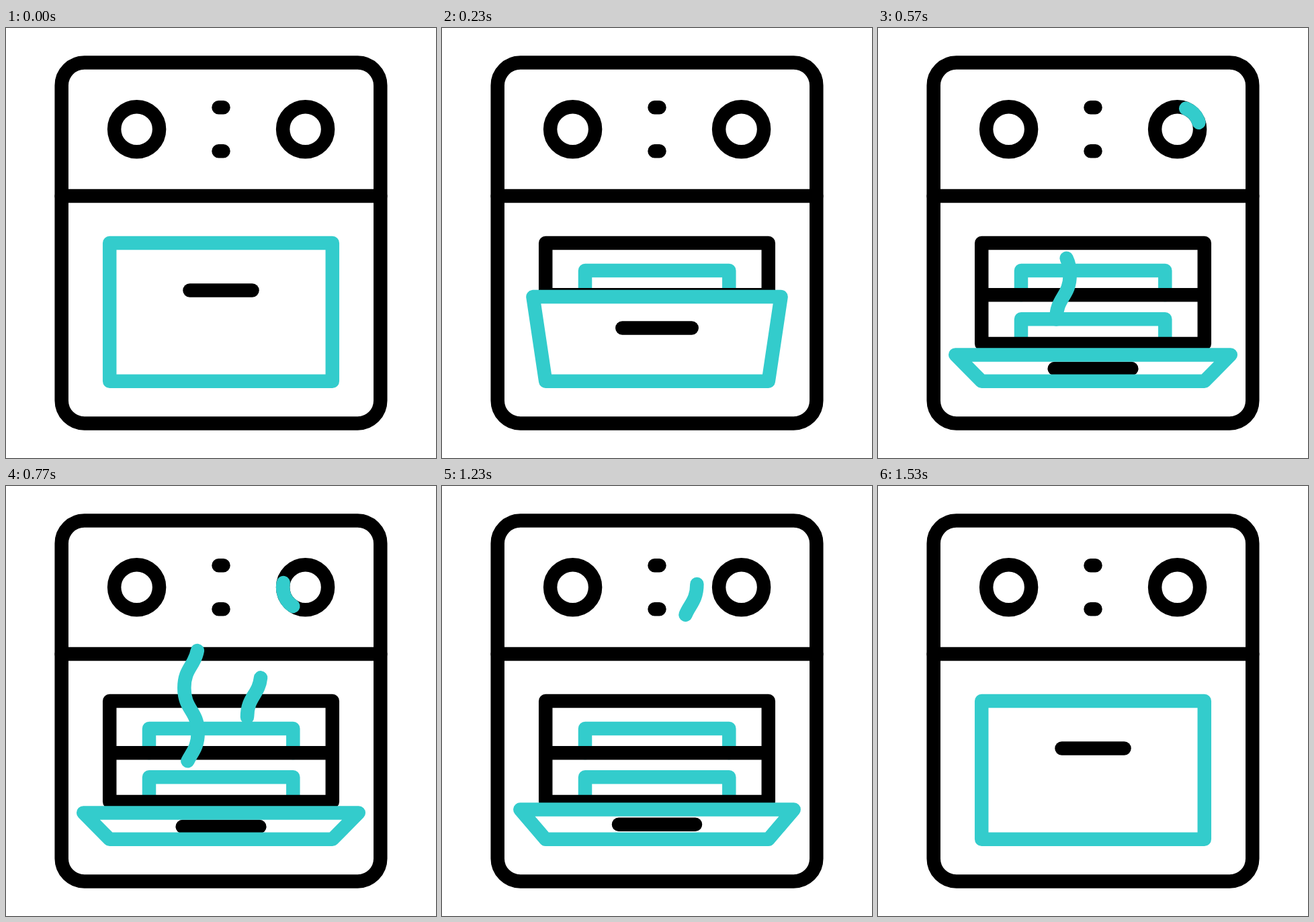
Recreate the animation shown at these times as an HTML page. Size 640 px wide and 640 px high, loop 1.67 s.

```html
<!DOCTYPE html>
<html lang="en">
<head>
<meta charset="utf-8">
<title>Oven</title>
<style>
  html, body { margin: 0; width: 100%; height: 100%; overflow: hidden; background: #fff; }
  svg { display: block; width: 100vw; height: 100vh; }
  svg * { stroke-linecap: round; stroke-linejoin: round; }
  .ink { stroke: #000; }
  .teal { stroke: #3cc; }
</style>
</head>
<body>
<svg viewBox="0 0 640 640" fill="none" stroke-width="20.5">
  <g class="ink">
    <rect x="82.7" y="51.5" width="474.6" height="537" rx="34"/>
    <path d="M82.7 250H557.3M316.5 118.2h7M316.5 183.2h7"/>
    <circle cx="194.6" cy="150.8" r="33.5"/>
    <circle cx="445.6" cy="150.8" r="33.5"/>
  </g>
  <g id="inside">
    <path class="teal" d="M213 397V361H427.3V397M213 470V433.3H427.3V470"/>
    <path class="ink" d="M154.2 470V320H485.8V470ZM154.2 397.3H485.8"/>
  </g>
  <path id="panel" fill="#fff"/>
  <path id="handle" class="ink"/>
  <path id="door" class="teal"/>
  <g class="teal">
    <path id="dial" pathLength="1" d="M445.6 117.3a33.5 33.5 0 0 1 0 67a33.5 33.5 0 0 1 0-67"/>
    <path id="steamA" pathLength="1"/>
    <path id="steamB" pathLength="1"/>
  </g>
</svg>
<script>
const LOOP = 1670, FPS = 30;
const $ = id => document.getElementById(id);

// Eased progress from step `start` over `span` steps
const ease = (n, start, span) => {
  const s = Math.min(1, Math.max(0, (n - start) / span));
  return s * s * (3 - 2 * s);
};

// Wavy line rising from (x, y) in three half waves of height h
const wave = (x, y, h) =>
  `M${x} ${y}c0 ${-h / 2} 20.4 ${-h / 2} 20.4 ${-h}` +
  `s-20.4 ${-h / 2} -20.4 ${-h}s20.4 ${-h / 2} 20.4 ${-h}`;

$('steamA').setAttribute('d', wave(265.3, 433.5, 66.5));
$('steamB').setAttribute('d', wave(359, 344, 66));

// id, head start, head span, tail start, tail span
const trims = [
  ['dial', 12.8, 14.6, 14.8, 14.6],
  ['steamA', 9.9, 15.2, 19.9, 14.5],
  ['steamB', 17.7, 14.6, 27, 14.6],
];

function drawDoor(open) {
  const dx = 39 * open, y = 320 + 166.4 * open;
  const shape = `M154.2 525.8L${154.2 - dx} ${y}H${485.8 + dx}L485.8 525.8Z`;
  $('panel').setAttribute('d', shape);
  $('door').setAttribute('d', shape);
  const hx = 46.5 + 10.8 * open;
  $('handle').setAttribute('d', `M${320 - hx} ${390.4 + 116.7 * open}h${2 * hx}`);
  $('inside').style.display = open > 0 ? '' : 'none';
}

function drawTrim([id, h0, hSpan, t0, tSpan], n) {
  const head = ease(n, h0, hSpan), tail = ease(n, t0, tSpan);
  const style = $(id).style;
  style.display = head > tail ? '' : 'none';
  style.strokeDasharray = `${head - tail} 2`;
  style.strokeDashoffset = -tail;
}

function draw() {
  const t = performance.now() % LOOP;
  const n = Math.floor(t * FPS / 1000 + 0.11);
  drawDoor(ease(n, 2.55, 9.13) - ease(n, 36.07, 9.13));
  trims.forEach(trim => drawTrim(trim, n));
  requestAnimationFrame(draw);
}
draw();
</script>
</body>
</html>
```
